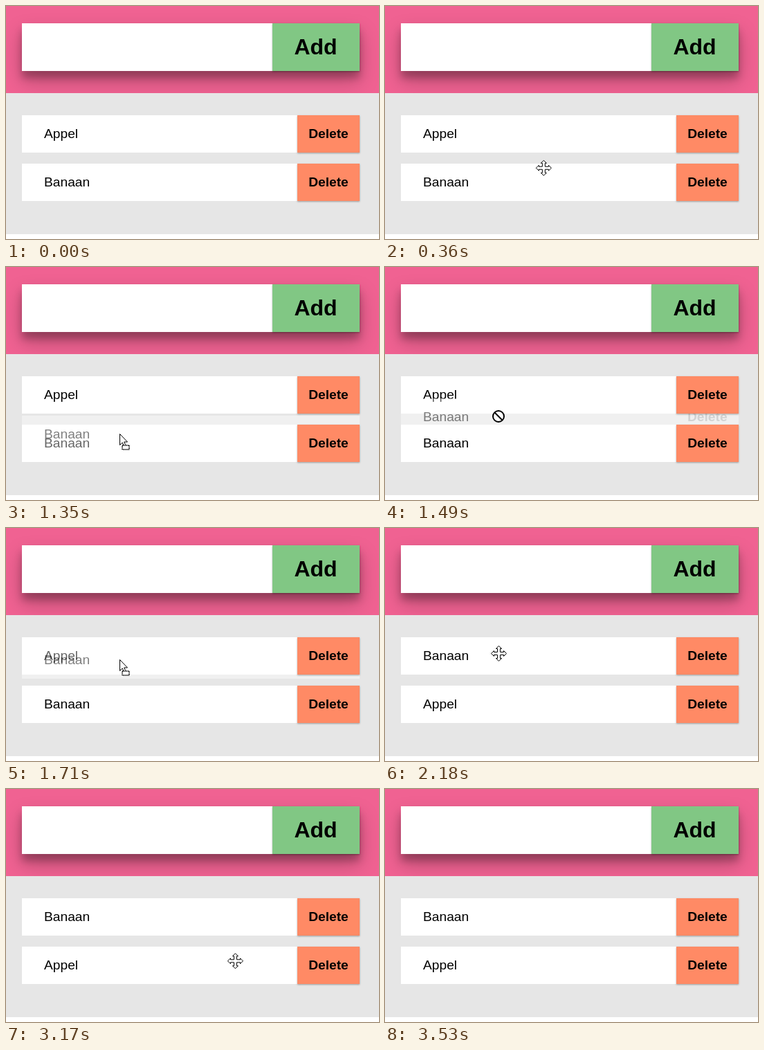
An HTML page for the animation above (3910 ms loop, 539x337 px).

```html
<!DOCTYPE html>
<html lang="en">
<head>
<meta charset="utf-8">
<title>Sortable list</title>
<style>
  html, body { margin: 0; width: 100%; height: 100%; overflow: hidden; background: #fff; }
  body { position: relative; font: 19.2px/54px Arial, "Liberation Sans", sans-serif; color: #000; }
  body * { box-sizing: border-box; }
  header, main, .form, .add, .row, .delete, #ghost, #cursors { position: absolute; }
  header { left: 0; top: 0; width: 539px; height: 126px; background: #f06292; overflow: hidden; }
  main { left: 0; top: 126px; width: 539px; height: 204px; background: #e6e6e6; }
  .form {
    left: 23px; top: 25px; width: 488px; height: 69px; background: #fff;
    box-shadow: 0 14px 28px rgba(0,0,0,.25), 0 10px 10px rgba(0,0,0,.22);
  }
  .add, .delete {
    right: 0; top: 0; font-weight: bold; text-align: center;
    box-shadow: 0 1px 3px rgba(0,0,0,.12), 0 1px 2px rgba(0,0,0,.24);
  }
  .add { width: 126px; height: 69px; padding-right: 1px; font-size: 32px; line-height: 69px; background: #81c784; }
  .delete { z-index: 2; width: 90px; height: 54px; background: #ff8a65; }
  .row, #ghost { left: 23px; width: 488px; height: 54px; padding-left: 32px; background: #fff; }
  .row:first-child { top: 32px; }
  .row:last-child { top: 102px; }
  #ghost { z-index: 1; top: 228px; color: rgba(0,0,0,.5); background: rgba(255,255,255,.4); }
  #ghost b { position: absolute; left: 414px; color: rgba(0,0,0,.12); }
  #cursors { z-index: 3; left: 0; top: 0; width: 539px; height: 337px; }
</style>
</head>
<body>
<header><div class="form"><div class="add">Add</div></div></header>
<main>
  <div class="row"><span class="label">Appel</span><div class="delete">Delete</div></div>
  <div class="row"><span class="label">Banaan</span><div class="delete">Delete</div></div>
</main>
<div id="ghost">Banaan<b>Delete</b></div>
<svg id="cursors" viewBox="0 0 539 337" fill="#fff" stroke="#000">
  <defs>
    <path id="pointer" d="M.5 .5V16.5L4.2 13L6.8 18.5L9.2 17.5L6.7 12H11.5Z"/>
    <path id="arm" d="M-2-2V-7H-4L0-11L4-7H2V-2"/>
  </defs>
  <g id="move">
    <use href="#arm"/>
    <use href="#arm" transform="rotate(90)"/>
    <use href="#arm" transform="rotate(180)"/>
    <use href="#arm" transform="rotate(270)"/>
  </g>
  <g id="blocked" stroke-width="2">
    <circle r="8"/><path d="M-5.5-5.5L5.5 5.5"/>
  </g>
  <g id="drop">
    <use href="#pointer"/>
    <rect x="4" y="17" width="10" height="6" stroke-width="2" stroke-dasharray="1" shape-rendering="crispEdges"/>
  </g>
  <g id="arrow"><use href="#pointer"/></g>
</svg>
<script>
  const LOOP = 3910, STEP = 74, STEPS = 7, DROP = 2100;
  const $ = id => document.getElementById(id);
  const cursors = document.querySelectorAll("#cursors > g");
  const labels = document.querySelectorAll(".label");

  const mix = (a, b, p) => a + (b - a) * p;
  const inRow = y => (y >= 158 && y < 212) || (y >= 228 && y < 282);
  // The screen is sampled in steps, so each glide advances in eight poses.
  const progress = t => Math.min(STEPS, Math.floor((t + 12) / STEP)) / STEPS;

  function approach(p) {
    const dip = 14 * Math.sin(Math.PI * p);
    return { kind: "move", x: mix(278, 164.5, p), y: mix(243, 254.5, p) - dip };
  }
  function drag(p) {
    const y = Math.round(mix(182, 241, (1 - p) ** 1.6));
    return { kind: inRow(y) ? "drop" : "blocked", x: 164, y, dragging: true };
  }
  function leave(p) {
    const eased = p ** 1.3;
    const y = mix(178.5, 324, eased);
    return { kind: inRow(y) ? "move" : "arrow", x: mix(165.5, 509, eased), y };
  }

  const scenes = [
    { at: 0, pose: () => ({}) },
    { at: 140, pose: approach },
    { at: 1350, pose: drag },
    { at: DROP, pose: () => ({ kind: "arrow", x: 164, y: 182 }) },
    { at: 2180, pose: () => ({ kind: "move", x: 164.5, y: 181.5 }) },
    { at: 2870, pose: leave },
    { at: 3450, pose: () => ({}) }
  ];

  function draw(t) {
    const scene = scenes.findLast(s => s.at <= t);
    const { kind, x, y, dragging } = scene.pose(progress(t - scene.at));
    for (const cursor of cursors) {
      const active = cursor.id === kind;
      cursor.style.display = active ? "" : "none";
      if (active) cursor.setAttribute("transform", `translate(${x} ${y})`);
    }
    $("ghost").style.display = dragging ? "" : "none";
    if (dragging) $("ghost").style.transform = `translateY(${y - 254}px)`;
    const names = t < DROP ? ["Appel", "Banaan"] : ["Banaan", "Appel"];
    labels.forEach((label, i) => label.textContent = names[i]);
  }

  const start = performance.now();
  function tick() {
    draw((performance.now() - start) % LOOP);
    requestAnimationFrame(tick);
  }
  tick();
</script>
</body>
</html>
```
